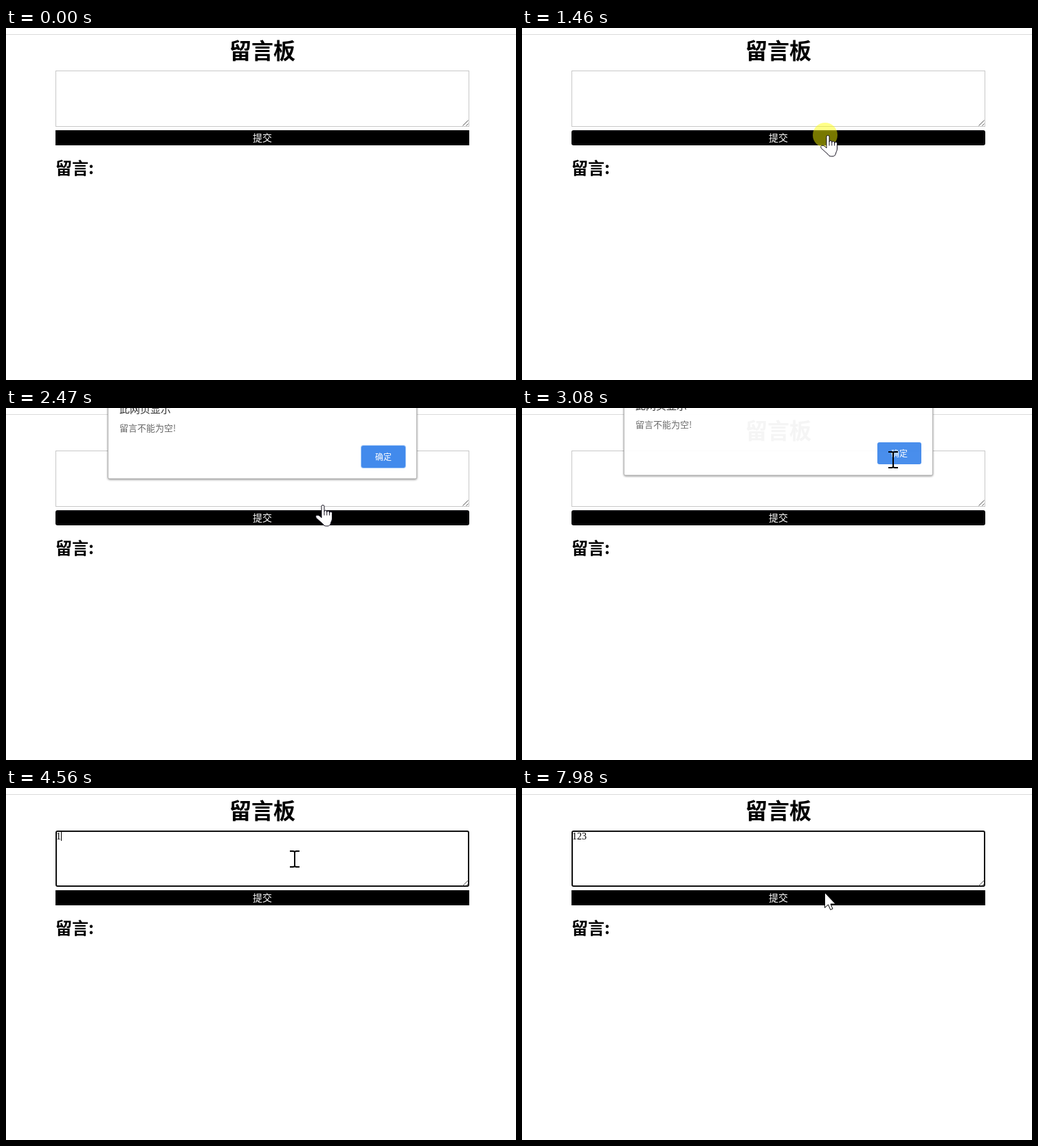
Write an HTML page that moves like this. It is 742 px wide and 513 px high and loops after 8 s.

```html
<!DOCTYPE html>
<html lang="zh-CN">
<head>
<meta charset="utf-8">
<title>留言板</title>
<style>
  html, body { margin: 0; width: 100%; height: 100%; overflow: hidden; background: #fff; }
  svg { display: block; width: 742px; height: 513px; }
  text { font-family: "Noto Sans CJK SC", "Noto Sans CJK", sans-serif; }
  .mid { text-anchor: middle; }
  .bold { font-weight: 700; }
  #typed { font: 14px "Liberation Serif", serif; }
  .shadow { filter: drop-shadow(0 1px 1.5px rgba(0, 0, 0, .45)); }
</style>
</head>
<body>
<svg viewBox="0 0 742 513">
  <rect width="742" height="513" fill="#fff"/>
  <rect y="9" width="742" height="1" fill="#dadada"/>
  <text class="mid bold" x="373" y="45" font-size="32">留言板</text>

  <rect id="area" fill="#fff"/>
  <path d="M664.5 142.5l8-8M669.5 142.5l3-3" stroke="#555" fill="none"/>
  <text id="typed" x="73" y="75"></text>
  <rect id="caret" y="64" width="1" height="13"/>

  <rect id="button" x="72" y="149" width="602" height="22"/>
  <rect id="ring" x="73.5" y="150.5" width="599" height="19" rx="2" fill="none" stroke="#17131c"/>
  <text class="mid" x="373" y="165" font-size="14" fill="#fff">提交</text>
  <text class="bold" x="72" y="213" font-size="24">留言:</text>

  <g id="dialog">
    <rect class="shadow" x="148.5" y="-80" width="449" height="183" rx="2" fill="#fff" stroke="#b4b4b4"/>
    <text x="165" y="7" font-size="15" fill="#333">此网页显示</text>
    <text x="165" y="34" font-size="13" fill="#666">留言不能为空!</text>
    <rect id="okRing" x="516" y="54" width="66" height="34" rx="4" fill="#a8cbf8"/>
    <rect x="517" y="55" width="64" height="32" rx="3" fill="#428aec"/>
    <text class="mid" x="549" y="76" font-size="12" fill="#fff">确定</text>
  </g>

  <circle id="click" r="18" fill="#ff0" fill-opacity=".47"/>

  <g id="hand" fill="#fff" stroke="#14101f" stroke-linejoin="round">
    <path d="M-1 19V2.5a2 2 0 0 1 4 0V10a1.9 1.9 0 0 1 3.8 0v1a1.9 1.9 0 0 1 3.8 0v1.2a1.9 1.9 0 0 1 3.9 0V20c0 3-1.5 4-2 7-.8 2.8-2.4 4-4.5 4H5.5c-2 0-3.3-1-4.5-3L-8.7 19.2C-9.8 17-9.1 15.3-7.2 15.2c2.2 0 4.5 1.6 6.2 3.8z"/>
    <path d="M3 10v5.500M6.800 11v4.500M10.600 12v3.500" fill="none"/>
  </g>
  <path id="arrow" d="M.5.5V22.500L5.500 18 8.800 25.500 12 24 9 17H16.200z" fill="#fff" stroke="#000"/>
  <path id="beam" d="M-7-11.500H-2.500Q0-11.500 0-9.500Q0-11.500 2.500-11.500H7M0-10V10M-7 11.500H-2.500Q0 11.500 0 9.500Q0 11.500 2.500 11.500H7" fill="none" stroke="#000" stroke-width="2"/>
</svg>
<script>
const LOOP = 8000;
const $ = id => document.getElementById(id);
const set = (id, attrs) => {
  for (const key in attrs) $(id).setAttribute(key, attrs[key]);
};
const show = (id, on) => set(id, { display: on ? "inline" : "none" });
const within = (t, from, to) => t >= from && t < to;
const mix = (a, b, p) => a + (b - a) * p;

// Progress from 0 to 1, held between equal steps.
function stepped(t, from, to, steps) {
  const p = Math.floor((t - from) / (to - from) * steps + 0.06) / steps;
  return Math.max(0, Math.min(1, p));
}

// Last row whose start time has passed.
const latest = (rows, t) => rows.filter(row => row[0] <= t).pop();

const DIALOG = [
  // time, vertical shift, opacity
  [0, 0, 0], [1690, -17, .4], [1770, -8, .84], [1840, -2, .97], [1920, 0, 1],
  [3080, -5, .96], [3160, -12, .5], [3250, 0, 0]
];

const CLICKS = [
  // from, to, x, y
  [1460, 1690, 441, 156], [2930, 3080, 537, 74], [3630, 3780, 417, 102]
];

function pointer(t) {
  if (t < 380) return ["none", 0, 0];
  if (t < 1230) {
    const left = 1 - stepped(t, 380, 1150, 10);
    const x = Math.round(445 + 141 * left ** 2.5);
    const y = Math.round(157 + 295 * left ** 1.8);
    return [y < 171 ? "hand" : "arrow", x, y];
  }
  if (t < 2470) return ["hand", 444, 156];
  if (t < 3080) {
    const p = stepped(t, 2470, 2860, 5);
    const ease = 1 - (1 - p) ** 1.6;
    return [p ? "arrow" : "hand", Math.round(mix(460, 537, ease)), Math.round(mix(141, 73, ease))];
  }
  if (t < 7910) {
    const p = t < 3310 ? 0 : t < 3400 ? .4 : t < 3480 ? .8 : 1;
    return ["beam", mix(540, 420, p), Math.round(mix(75, 103, p)) + .5];
  }
  return t < 7980 ? ["beam", 432, 126.5] : ["arrow", 440, 152];
}

function drawPage(t) {
  const typing = t >= 3630;
  set("area", typing
    ? { x: 73, y: 63, width: 600, height: 80, rx: 2, stroke: "#101010", "stroke-width": 2 }
    : { x: 72.5, y: 62.5, width: 601, height: 81, rx: 0, stroke: "#c8c8c8", "stroke-width": 1 });

  const pressed = within(t, 1460, 3630);
  set("button", { rx: pressed ? 3 : 0 });
  show("ring", pressed);

  const count = [4560, 4820, 5020].filter(time => time <= t).length;
  $("typed").textContent = "123".slice(0, count);
  set("caret", { x: 73 + 7 * count });
  show("caret", within(t, 4560, 5570) || within(t, 6120, 6430));
}

function drawOverlay(t) {
  const [, shift, opacity] = latest(DIALOG, t);
  set("dialog", { transform: `translate(0 ${shift})`, opacity });
  show("okRing", t < 2930);

  const click = CLICKS.find(([from, to]) => within(t, from, to));
  show("click", click);
  if (click) set("click", { cx: click[2], cy: click[3] });

  const [kind, x, y] = pointer(t);
  for (const id of ["hand", "arrow", "beam"]) show(id, id === kind);
  if (kind !== "none") set(kind, { transform: `translate(${x} ${y})` });
}

function frame() {
  const t = performance.now() % LOOP;
  drawPage(t);
  drawOverlay(t);
  requestAnimationFrame(frame);
}
frame();
</script>
</body>
</html>
```
